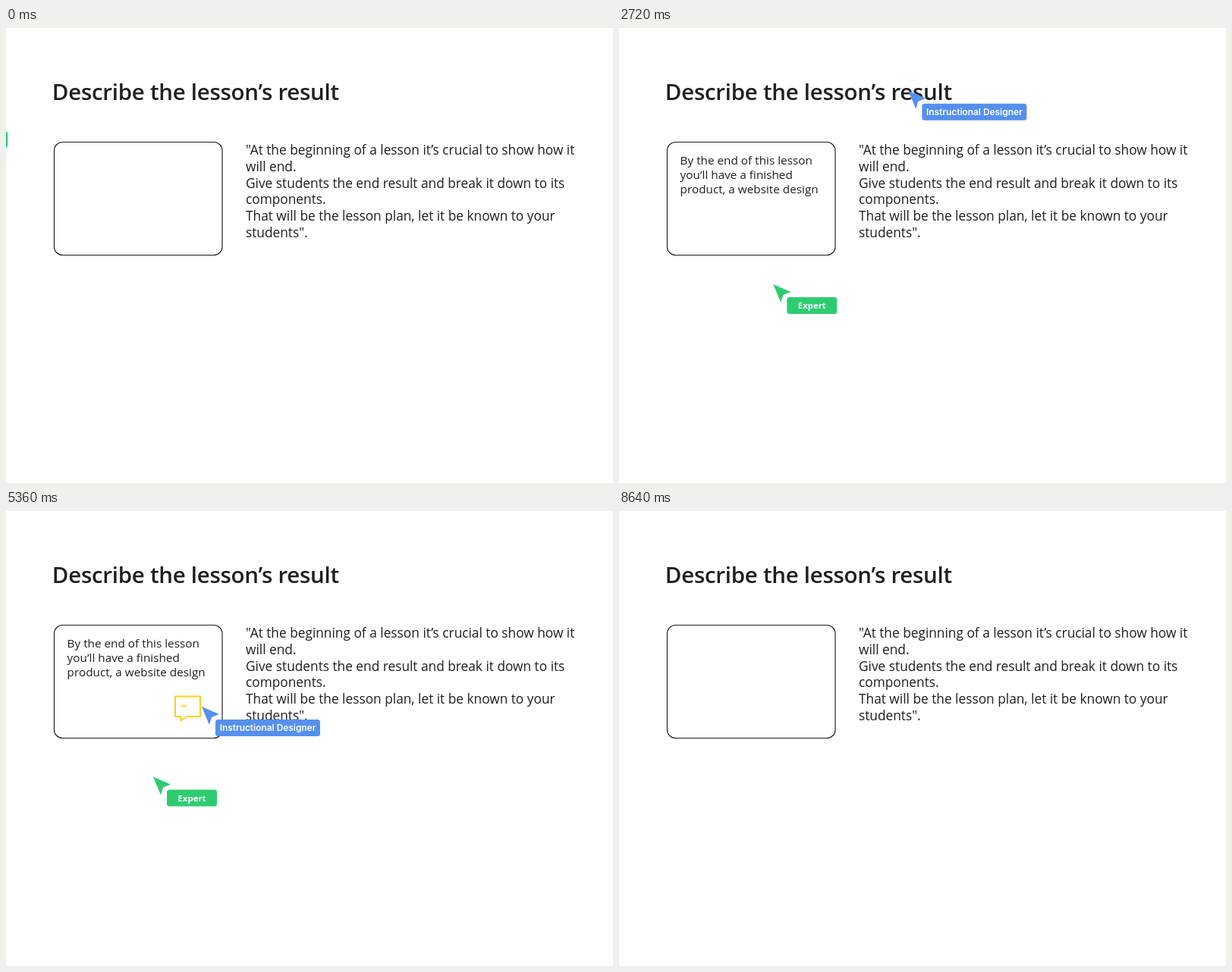
An HTML page with a canvas that plays this animation: 800x600 px, repeating every 8.68 s.

```html
<!DOCTYPE html>
<html lang="en">
<head>
<meta charset="utf-8">
<title>Describe the lesson’s result</title>
<style>
  html, body { margin: 0; width: 100%; height: 100%; overflow: hidden; background: #fff; }
  canvas { display: block; }
</style>
</head>
<body>
<canvas id="stage" width="800" height="600"></canvas>
<script>
const ctx = document.getElementById('stage').getContext('2d');
const LOOP = 8680;
const INK = '#1f1f1f', GREEN = '#2ecc71', BLUE = '#5590ee', YELLOW = '#fdd017';
const SANS = '"Open Sans", "Noto Sans", sans-serif';

const quote = [
  '"At the beginning of a lesson it’s crucial to show how it',
  'will end.',
  'Give students the end result and break it down to its',
  'components.',
  'That will be the lesson plan, let it be known to your',
  'students".'
];
const answer = [
  'By the end of this lesson',
  'you’ll have a finished',
  'product, a website design'
];

const progress = (t, from, to) => Math.min(1, Math.max(0, (t - from) / (to - from)));
const bezier = (s, a, b) => 3 * a * s * (1 - s) ** 2 + 3 * b * s * s * (1 - s) + s ** 3;

// Same curve as the CSS "ease" keyword.
function ease(p) {
  let low = 0, high = 1;
  for (let i = 0; i < 24; i++) {
    const mid = (low + high) / 2;
    if (bezier(mid, 0.25, 0.25) < p) low = mid; else high = mid;
  }
  return bezier((low + high) / 2, 0.1, 1);
}

const travel = (a, b, p) => a.map((v, i) => v + (b[i] - v) * ease(p));

function text(str, x, y, font, color = INK, align = 'left', spacing = 0) {
  ctx.font = font;
  ctx.fillStyle = color;
  ctx.textAlign = align;
  ctx.letterSpacing = spacing + 'px';
  ctx.fillText(str, x, y);
}

function lines(list, x, y, step, font) {
  list.forEach((str, i) => text(str, x, y + i * step, font));
}

function roundRect(x, y, w, h, r) {
  ctx.beginPath();
  ctx.roundRect(x, y, w, h, r);
}

function cursor([x, y], color, label, width, font) {
  ctx.save();
  ctx.translate(x, y);
  ctx.fillStyle = color;
  ctx.beginPath();
  ctx.moveTo(0, 0);
  ctx.lineTo(23, 10);
  ctx.lineTo(13, 14);
  ctx.lineTo(10, 24);
  ctx.closePath();
  ctx.fill();
  roundRect(18, 17, width, 22, 3.5);
  ctx.fill();
  text(label, 18 + width / 2, 32, font, '#fff', 'center');
  ctx.restore();
}

// Strokes the first part p of a polyline.
function drawOn(points, p, width) {
  if (p <= 0) return;
  let length = 0;
  ctx.beginPath();
  points.forEach(([x, y], i) => {
    ctx.lineTo(x, y);
    if (i) length += Math.hypot(x - points[i - 1][0], y - points[i - 1][1]);
  });
  ctx.lineWidth = width;
  ctx.setLineDash(p < 1 ? [length * p, length + 1] : []);
  ctx.stroke();
  ctx.setLineDash([]);
}

function comment(t) {
  ctx.strokeStyle = YELLOW;
  ctx.lineJoin = 'round';
  ctx.lineCap = 'butt';
  drawOn([[230, 271], [223, 271], [223, 244.5], [256, 244.5], [256, 271],
          [239, 271], [230.5, 276.5], [230, 270]], progress(t, 4520, 5360), 2);
  drawOn([[230.5, 257], [248, 257]], progress(t, 5200, 5560), 1.6);
  drawOn([[230.5, 261.7], [244, 261.7]], progress(t, 5400, 5760), 1.6);
  for (let i = 0; i < 5; i++) {
    const half = i % 2 ? 2.5 : 1.5, x = 231.5 + i * 2;
    const start = 6280 + i * 80;
    drawOn([[x, 252 + half], [x, 252 - half]], progress(t, start, start + 200), 1.1);
  }
}

function greenPosition(t) {
  const rest = [245, 282.5];
  return t < 2360
    ? travel([-82, 119], rest, progress(t, 0, 680))
    : travel(rest, [194, 350.5], progress(t, 2360, 3060));
}

function draw(t) {
  ctx.globalAlpha = 1;
  ctx.fillStyle = '#fff';
  ctx.fillRect(0, 0, 800, 600);

  text('Describe the lesson’s result', 60.8, 95, `600 29.5px ${SANS}`, INK, 'left', -0.28);
  lines(quote, 316, 167.4, 21.65, `17.3px ${SANS}`);
  roundRect(63.5, 150.5, 221.5, 149, 11);
  ctx.strokeStyle = INK;
  ctx.lineWidth = 1.15;
  ctx.stroke();

  const visible = 1 - progress(t, 7640, 8080);
  if (!visible) return;

  ctx.globalAlpha = visible * progress(t, 720, 1120);
  lines(answer, 80.6, 179.8, 19.3, `15.3px ${SANS}`);

  ctx.globalAlpha = visible;
  comment(t);
  cursor(greenPosition(t), GREEN, 'Expert', 66, `700 11.4px ${SANS}`);
  if (t >= 2320) {
    const blue = travel([467, -39], [258, 258], progress(t, 2320, 3920));
    cursor(blue, BLUE, 'Instructional Designer', 138, '600 11.9px Inter, Lato, sans-serif');
  }
}

const start = performance.now();
function frame() {
  draw((performance.now() - start) % LOOP);
  requestAnimationFrame(frame);
}
frame();
</script>
</body>
</html>
```
